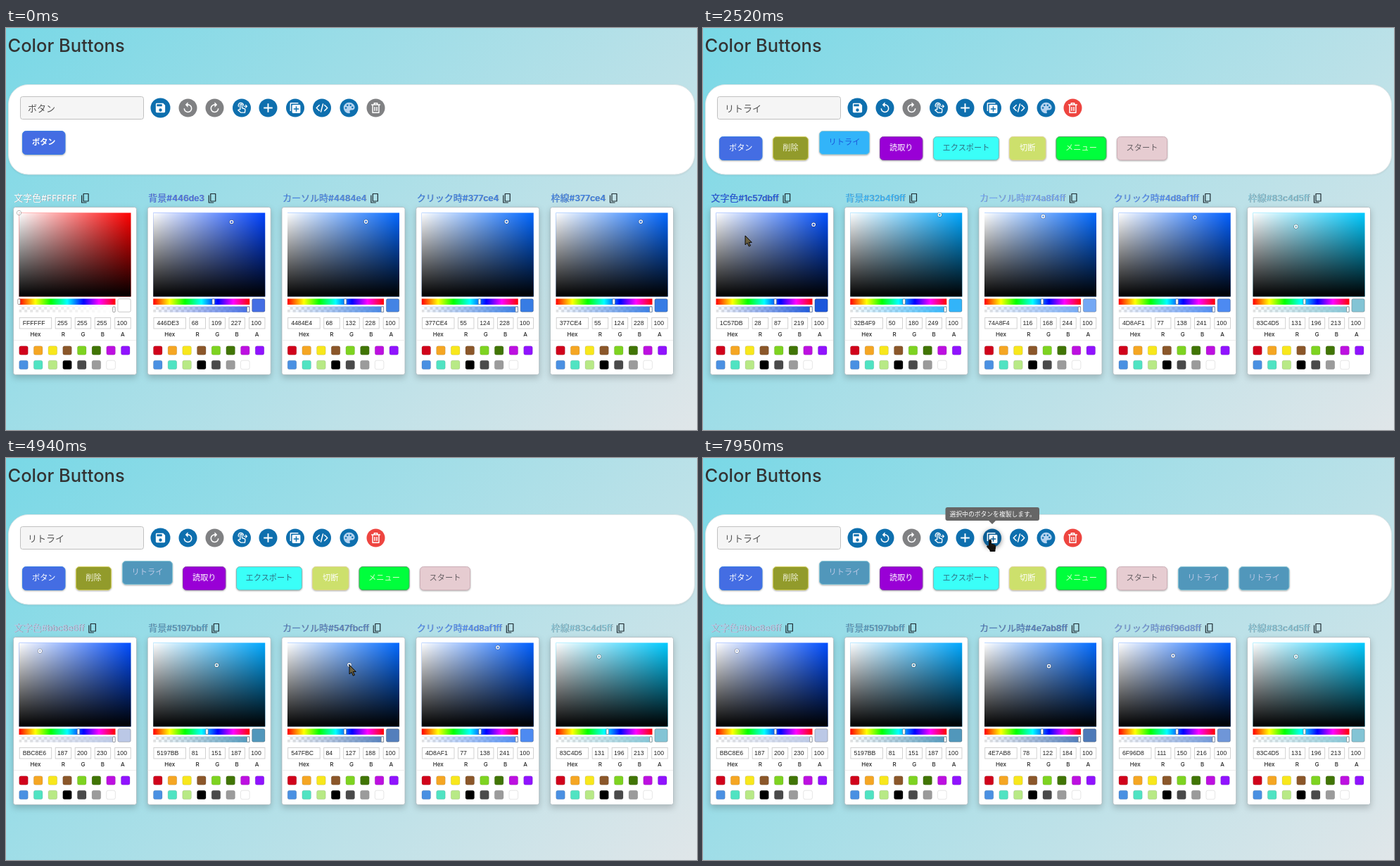
An HTML page that plays this animation: 982x571 px, repeating every 8000 ms.

```html
<!DOCTYPE html>
<html lang="ja">
<head>
<meta charset="utf-8">
<title>Color Buttons</title>
<style>
html, body { margin: 0; width: 100%; height: 100%; overflow: hidden; }
body { background: linear-gradient(135deg, #79d8e6, #e0e6e9); }
svg { display: block; width: 982px; height: 571px; }
text { font-family: "Noto Sans CJK JP", "Noto Sans CJK", sans-serif; white-space: pre; }
.title, .label, .caption { font-family: Inter, "Noto Sans CJK JP", "Noto Sans CJK", sans-serif; font-weight: 500; }
.title { font-size: 25.5px; fill: #333; }
.label { font-size: 12.2px; }
.label .ja { font-size: 13px; font-weight: 400; }
.caption { font-size: 8px; fill: #222; text-anchor: middle; }
.field { font: 8.7px "Liberation Sans", Arial, sans-serif; fill: #222; }
.input { font-size: 13px; font-weight: 300; fill: #555; }
.button { font-size: 11.2px; text-anchor: middle; }
.tip { font-size: 8.8px; fill: #fff; }
.card { filter: drop-shadow(0 1px 1px rgba(0,0,0,.08)); }
.panel { filter: drop-shadow(0 4px 5px rgba(0,0,0,.2)); }
.raised { filter: drop-shadow(0 1px 1px rgba(0,0,0,.32)); }
.hovered { filter: drop-shadow(0 2px 3px rgba(0,0,0,.45)); }
</style>
</head>
<body>
<svg id="stage" viewBox="0 0 982 571" xmlns="http://www.w3.org/2000/svg">
  <defs>
    <linearGradient id="white"><stop stop-color="#fff"/><stop offset="1" stop-color="#fff" stop-opacity="0"/></linearGradient>
    <linearGradient id="black" x2="0" y2="1"><stop stop-opacity="0"/><stop offset="1"/></linearGradient>
    <linearGradient id="hue">
      <stop stop-color="#f00"/><stop offset=".17" stop-color="#ff0"/><stop offset=".33" stop-color="#0f0"/>
      <stop offset=".5" stop-color="#0ff"/><stop offset=".67" stop-color="#00f"/><stop offset=".83" stop-color="#f0f"/>
      <stop offset="1" stop-color="#f00"/>
    </linearGradient>
    <pattern id="checker" width="8" height="8" patternUnits="userSpaceOnUse">
      <path d="M0 0h8v8H0z" fill="#fff"/><path d="M0 0h4v4H0zM4 4h4v4H4z" fill="#e2e2e2"/>
    </pattern>
  </defs>
</svg>
<script>
const LOOP = 8000;
const stage = document.getElementById('stage');

function set(node, attrs) {
  for (const key in attrs) node.setAttribute(key, attrs[key]);
  return node;
}
function add(parent, tag, attrs = {}, text) {
  const node = set(document.createElementNS('http://www.w3.org/2000/svg', tag), attrs);
  if (text !== undefined) node.textContent = text;
  parent.appendChild(node);
  return node;
}
const box = (parent, x, y, width, height, fill, more = {}) =>
  add(parent, 'rect', { x, y, width, height, fill, ...more });
const show = (node, on) => set(node, { visibility: on ? 'visible' : 'hidden' });
const clamp = v => Math.max(0, Math.min(1, v));

// Colour helpers
const rgb = hex => [1, 3, 5].map(i => parseInt(hex.slice(i, i + 2), 16));
const toHex = parts => '#' + parts.map(v => Math.round(v).toString(16).padStart(2, '0')).join('');
function mix(a, b, k) {
  const to = rgb(b);
  return toHex(rgb(a).map((v, i) => v + (to[i] - v) * k));
}
function toHsv(hex) {
  const [r, g, b] = rgb(hex), max = Math.max(r, g, b), d = max - Math.min(r, g, b);
  let h = 0;
  if (d) h = max === r ? (g - b) / d : max === g ? 2 + (b - r) / d : 4 + (r - g) / d;
  return { h: (h * 60 + 360) % 360, s: max ? d / max : 0, v: max / 255 };
}
function fromHsv(h, s, v) {
  return toHex([5, 3, 1].map(n => {
    const k = (n + h / 60) % 6;
    return 255 * v * (1 - s * clamp(Math.min(k, 4 - k)));
  }));
}

const holds = [[0], ...[[100, 1020, 10], [1170, 2070, 7], [2220, 3120, 7], [3270, 4190, 7],
  [4340, 4490, 2], [4840, 5830, 8], [5980, 6900, 7], [7050, 7950, 7]].map(([from, to, n]) =>
  Array.from({ length: n }, (_, i) => from + (to - from) * i / (n - 1)))].flat();
const held = t => holds.reduce((last, h) => h <= t ? h : last, 0);

// Script of the session
const SELECT = 2300;
const adds = [560, 760, 960, 1140, 1400, 1580, 1740];
const copies = [7350, 7700];
const taps = [[5940, 6150], [6350, 6500], [6700, 6850]];
const presses = [...[...adds, ...copies].map(t => [t - 60, t + 100]), ...taps,
  [2220, 2380], [2500, 3420], [3570, 3880], [4020, 4200], [4840, 5000], [5200, 5450]];
const handTimes = [[440, 1760], [2200, 2400], [5800, 7100], [7190, LOOP]];
const drags = [
  { from: 2660, to: 3400, hex: '#bbc8e6' },
  { from: 3560, to: 3860, hex: '#5197bb' },
  { from: 4830, to: 4975, hex: '#4e7ab8' },
  { from: 5200, to: 5395, hex: '#6f96d8' }
];
const path = [
  [100, 829, 480], [450, 371, 107], [1700, 371, 107], [1920, 319, 177], [2070, 262, 183],
  [2220, 203, 165], [2370, 196, 165], [2520, 60, 295], [2970, 56, 290], [3270, 48, 274],
  [3420, 48, 274], [3600, 270, 286], [3870, 299, 294], [4036, 434, 289], [4190, 444, 290],
  [4490, 484, 292], [4840, 488, 294], [4980, 491, 295], [5200, 650, 285], [5400, 668, 280],
  [5550, 668, 280], [5830, 222, 168], [5980, 218, 166], [6900, 216, 167], [7200, 408, 116], [LOOP, 408, 116]
];
const within = (list, t) => list.some(([a, b]) => t >= a && t < b);
const ramp = (t, a, b) => Math.min(clamp((t - a) / 150), 1 - clamp((t - b) / 150));

function pointer(t) {
  const i = Math.max(1, path.findIndex(p => p[0] >= t));
  const [t0, x0, y0] = path[i - 1], [t1, x1, y1] = path[i];
  const u = clamp((t - t0) / (t1 - t0)), k = u * u * (3 - 2 * u);
  return { x: x0 + (x1 - x0) * k, y: y0 + (y1 - y0) * k };
}

// Heading and card
add(stage, 'text', { x: 2.5, y: 33.5, class: 'title' }, 'Color Buttons');
box(stage, 3.5, 80.5, 975, 127.5, '#fff', { rx: 28, class: 'card', stroke: '#dfe5e6' });
box(stage, 20.5, 97.5, 175, 32, '#f5f5f5', { rx: 3, stroke: '#c0c0c0' });
const input = add(stage, 'text', { x: 31, y: 119, class: 'input' });

// Toolbar
const BLUE = '#0e6fae', GREY = '#808183';
const line = { fill: 'none', stroke: '#fff', 'stroke-width': 2, 'stroke-linecap': 'round', 'stroke-linejoin': 'round' };
const replay = 'M12 5V1L7 6l5 5V7c3.31 0 6 2.69 6 6s-2.69 6-6 6-6-2.69-6-6H4c0 4.42 3.58 8 8 8s8-3.58 8-8-3.58-8-8-8z';
function tool(cx, d, { r = 13, flip = '1 1', attrs = { fill: '#fff' } } = {}) {
  const disc = add(stage, 'circle', { cx, cy: 113.5, r, fill: BLUE });
  const icon = add(stage, 'g', { transform: `translate(${cx} 113.5) scale(.74) scale(${flip}) translate(-12 -12)` });
  add(icon, 'path', { d, ...attrs });
  return { disc, icon };
}
tool(219.5, 'M17 3H5a2 2 0 0 0-2 2v14a2 2 0 0 0 2 2h14a2 2 0 0 0 2-2V7zm-5 16a3 3 0 1 1 0-6 3 3 0 0 1 0 6zm3-10H5V5h10z', { r: 14 });
const undo = tool(258.5, replay);
set(tool(296.5, replay, { flip: '-1 1' }).disc, { fill: GREY });
const touch = tool(335, 'M9 15V6.5a1.8 1.8 0 0 1 3.6 0V12l5 1.8q1.4.7 1.1 2.2L18 21H10.500L5 16.500l1.200-1.200zM6 9.500A5 5 0 1 1 15.500 7', { attrs: { ...line, 'stroke-width': 1.8 } });
add(touch.icon, 'path', { d: 'M16 9h6M19.500 6.500L22 9l-2.500 2.500', ...line, 'stroke-width': 1.6 });
const plus = tool(372.5, 'M20.500 13.300h-7.200v7.200h-2.600v-7.200H3.500v-2.600h7.200V3.500h2.600v7.200h7.200z');
const ripple = add(stage, 'circle', { cx: 373.500, cy: 111.500, r: 11, fill: '#a0b830', opacity: .7 });
const copy = tool(411, 'M4 6H2v14c0 1.100.9 2 2 2h14v-2H4zm16-4H8a2 2 0 0 0-2 2v12a2 2 0 0 0 2 2h12a2 2 0 0 0 2-2V4a2 2 0 0 0-2-2zm-1 9h-4v4h-2v-4H9V9h4V5h2v4h4z', { flip: '1 -1' });
tool(449, 'M7 6.500L1.500 12 7 17.500M17 6.500L22.500 12 17 17.500M14 4.500l-4 15', { attrs: line });
const palette = tool(487.5, 'M12 1.500A10.500 10.500 0 1 0 12 22.500c2.500 0 2-2.500 1.400-3.400C12.700 17.500 14 16 15.500 16H18c3 0 5-2.200 5-5 0-5-5-9.500-11-9.500z', { attrs: { fill: '#b5d3f0' } });
[[6, 12], [9, 7], [15, 7], [18.500, 11]].forEach(([cx, cy]) => add(palette.icon, 'circle', { cx, cy, r: 1.700, fill: BLUE }));
const trash = tool(525.5, 'M4 6h16M9 5.500V3h6v2.500M6 6.500V21h12V6.500M10 10.500v6.500M14 10.500v6.500', { attrs: line });

// Sample buttons: x, width, text, fill, text colour, border
const buttons = [
  [23.5, 60.5, 'ボタン', '#446de3', '#ffffff', '#377ce4'],
  [99.5, 50, '削除', '#929b2b', '#f2f3df', '#d4cf5c'],
  [165.5, 71, 'リトライ', '#32b4f9', '#1c57db', '#83c4d5'],
  [251.5, 60.5, '読取り', '#9900d6', '#ffffff', '#8a3bb0'],
  [327.5, 93, 'エクスポート', '#3afff8', '#2f6f80', '#79b9b6'],
  [435.5, 51.5, '切断', '#cde06c', '#ffffff', '#dfd48c'],
  [502, 71, 'メニュー', '#00ff3c', '#d9ffd0', '#43a65a'],
  [588.5, 71, 'スタート', '#e6ccd1', '#665f63', '#cdb0b8'],
  [675.5, 71, 'リトライ', '#5197bb', '#bbc8e6', '#83c4d5'],
  [762, 71, 'リトライ', '#5197bb', '#bbc8e6', '#83c4d5']
].map(([x, w, label, fill, ink, stroke]) => {
  const g = add(stage, 'g');
  const face = box(g, x, 154.5, w, 33, fill, { rx: 5, stroke, class: 'raised' });
  const text = add(g, 'text', { x: x + w / 2, y: 174, fill: ink, class: 'button' }, label);
  return { g, face, text };
});
const born = [0, ...adds, ...copies];

// Colour panels
const names = ['文字色', '背景', 'カーソル時', 'クリック時', '枠線'];
const first = ['#FFFFFF', '#446de3', '#4484e4', '#377ce4', '#377ce4'];
const loaded = ['#1c57db', '#32b4f9', '#74a8f4', '#4d8af1', '#83c4d5'];
const presets = ['#d0021b', '#f5a623', '#f8e71c', '#8b572a', '#7ed321', '#417505', '#bd10e0', '#9013fe',
  '#4a90e2', '#50e3c2', '#b8e986', '#000', '#4a4a4a', '#9b9b9b', '#fff'];
const AREA = { x: 8.3, y: 262.5, w: 159, h: 119 };
const panelX = i => 10.2 + i * 190.75;

function makePanel(name, i) {
  const g = add(stage, 'g', { transform: `translate(${panelX(i)} 0)` });
  const { x, y, w, h } = AREA;
  const label = (dx, fill) => {
    const text = add(g, 'text', { x: 1 + dx, y: 245.500 + dx, class: 'label', fill });
    add(text, 'tspan', { class: 'ja' }, name);
    return { text, code: add(text, 'tspan') };
  };
  const shadow = label(.9, '#87949d'), front = label(0);
  const clip = add(g, 'g');
  add(clip, 'path', { d: 'M3.500.500h7v10.500h-7zM1 2.500V13H8', fill: 'none', stroke: '#1d2a30', 'stroke-width': 1.200, 'stroke-linejoin': 'round' });

  box(g, .3, 254.500, 175, 238, '#fff', { rx: 3, class: 'panel', stroke: '#a9b7bb', 'stroke-width': .8 });
  const base = box(g, x, y, w, h);
  box(g, x, y, w, h, 'url(#white)');
  box(g, x, y, w, h, 'url(#black)');
  const ring = add(g, 'g');
  add(ring, 'circle', { r: 3, fill: 'none', stroke: '#222', 'stroke-opacity': .5, 'stroke-width': 1 });
  add(ring, 'circle', { r: 2.200, fill: 'none', stroke: '#fff', 'stroke-width': 1.200 });

  box(g, x, 384.500, 137, 8.500, 'url(#hue)');
  const knob = { rx: .8, stroke: '#666', 'stroke-width': .6 };
  const hueKnob = box(g, 0, 385, 3.400, 7.500, '#fff', knob);
  box(g, x, 395.500, 137, 8.300, 'url(#checker)');
  const fade = add(g, 'linearGradient', { id: 'fade' + i });
  const stops = [0, 1].map(offset => add(fade, 'stop', { offset, 'stop-opacity': offset }));
  box(g, x, 395.500, 137, 8.300, `url(#fade${i})`);
  box(g, 141.500, 396, 3.400, 7.500, '#fff', knob);
  const swatch = box(g, 148.700, 384.800, 18.300, 18.500, '#fff', { rx: 2, stroke: '#000', 'stroke-opacity': .28, 'stroke-width': .8 });

  const fields = [[9, 45.500, 'Hex'], [60, 22.500, 'R'], [88, 22.500, 'G'], [116, 22.500, 'B'], [144.500, 22.500, 'A']].map(([fx, fw, caption], n) => {
    box(g, fx, 411.500, fw, 15.500, '#fff', { stroke: '#ccc', 'stroke-width': .9 });
    add(g, 'text', { x: fx + fw / 2, y: 437.800, class: 'caption' }, caption);
    return add(g, 'text', { x: fx + (n ? 2.800 : 4.500), y: 422.300, class: 'field' });
  });
  box(g, .8, 443, 174, 1, '#eee');
  presets.forEach((fill, n) => box(g, 8.500 + n % 8 * 20.680, 451.700 + (n > 7 ? 20.500 : 0), 12.600, 12.600, fill,
    { rx: 2.500, stroke: '#000', 'stroke-opacity': .15, 'stroke-width': .7 }));
  return { shadow, front, clip, base, ring, hueKnob, stops, swatch, fields };
}
const panels = names.map(makePanel);

function panelColor(i, t) {
  if (t < SELECT) return first[i];
  const drag = drags[i];
  if (!drag || t < drag.from) return loaded[i];
  if (t >= drag.to) return drag.hex;
  const p = pointer(t);
  return fromHsv(toHsv(drag.hex).h, clamp((p.x - panelX(i) - AREA.x) / AREA.w), 1 - clamp((p.y - AREA.y) / AREA.h));
}

function drawPanel(p, hex, suffix) {
  const { h, s, v } = toHsv(hex);
  p.shadow.code.textContent = p.front.code.textContent = hex + suffix;
  set(p.front.text, { fill: hex });
  set(p.clip, { transform: `translate(${p.front.text.getComputedTextLength() + 6.500} 235)` });
  set(p.base, { fill: `hsl(${h} 100% 50%)` });
  set(p.ring, { transform: `translate(${AREA.x + s * AREA.w} ${AREA.y + (1 - v) * AREA.h})` });
  set(p.hueKnob, { x: AREA.x + h / 360 * 137 - 1.700 });
  p.stops.forEach(stop => set(stop, { 'stop-color': hex }));
  set(p.swatch, { fill: hex });
  [hex.slice(1).toUpperCase(), ...rgb(hex), 100].forEach((value, n) => { p.fields[n].textContent = value; });
}

// Tooltips
function tooltip(x, w, tip, text) {
  const g = add(stage, 'g');
  box(g, x, 70, w, 19, '#666', { rx: 3 });
  add(g, 'path', { d: `M${tip - 5} 89h10l-5 5z`, fill: '#666' });
  add(g, 'text', { x: x + 6, y: 83, class: 'tip' }, text);
  return g;
}
const addTip = tooltip(271, 203, 372.5, 'ランダムなテキスト、色でボタンを作成します。');
const copyTip = tooltip(344.5, 133.5, 411, '選択中のボタンを複製します。');

// Mouse pointers
const cursor = add(stage, 'g');
const arrow = add(cursor, 'path', { d: 'M0 0V13L3 10.300 5.300 15.200 7.500 14.200 5.200 9.500H9.300Z', stroke: '#000', 'stroke-width': .9 });
const hand = add(cursor, 'g');
const palm = add(hand, 'path', { d: 'M-1.500 1.500a1.500 1.500 0 0 1 3 0V6l5 1.400q1.500.6 1.200 2.600L7 14.500V16.500H0V15L-4 10.500q-1-1.600.6-1.900L-1.500 9.600Z', stroke: '#111', 'stroke-width': 1 });
add(hand, 'path', { d: 'M1.500 6v3M3.700 7v2.500M5.700 7.500V10', fill: 'none', stroke: '#2a2418', 'stroke-width': .8 });

function render(t) {
  const picked = t >= SELECT;
  const colors = names.map((_, i) => panelColor(i, t));
  panels.forEach((p, i) => drawPanel(p, colors[i], picked ? 'ff' : ''));
  input.textContent = picked ? 'リトライ' : 'ボタン';

  const current = picked ? 2 : 0;
  buttons.forEach((b, i) => {
    show(b.g, t >= born[i]);
    set(b.g, { transform: `translate(0 ${i === current ? -8 : 0})` });
  });
  set(buttons[0].text, { 'font-weight': picked ? 400 : 700 });
  const retry = buttons[2];
  const over = ramp(t, 5720, 7000);
  const down = Math.max(...taps.map(([a, b]) => ramp(t, a, b)));
  const [ink, fill, hover, active] = picked ? colors : loaded;
  set(retry.face, { fill: mix(mix(fill, hover, over), active, down), class: over > .5 ? 'hovered' : 'raised' });
  set(retry.text, { fill: ink, 'fill-opacity': picked ? 1 : .65 });

  const started = t >= adds[0];
  set(undo.disc, { fill: started ? BLUE : GREY });
  set(trash.disc, { fill: started ? '#ee4540' : GREY });
  const onPlus = t >= 440 && t < 2200, onCopy = t >= 7190;
  [[plus, onPlus], [copy, onCopy]].forEach(([item, on]) =>
    set(item.disc, { fill: on ? '#0b5e95' : BLUE, class: on ? 'hovered' : '' }));
  const pressed = within(presses, t);
  show(ripple, onPlus && pressed);
  show(addTip, onPlus);
  show(copyTip, onCopy);

  const { x, y } = pointer(t), pointing = within(handTimes, t);
  show(cursor, t >= 100);
  show(arrow, t >= 100 && !pointing);
  show(hand, pointing);
  set(cursor, { transform: `translate(${x} ${y})` });
  set(arrow, { fill: pressed ? '#6b6040' : '#000' });
  set(palm, { fill: !pressed ? '#15130f' : onPlus ? '#efb160' : '#b98440' });
}

const start = performance.now();
function loop() {
  render(held((performance.now() - start) % LOOP));
  requestAnimationFrame(loop);
}
loop();
</script>
</body>
</html>
```
